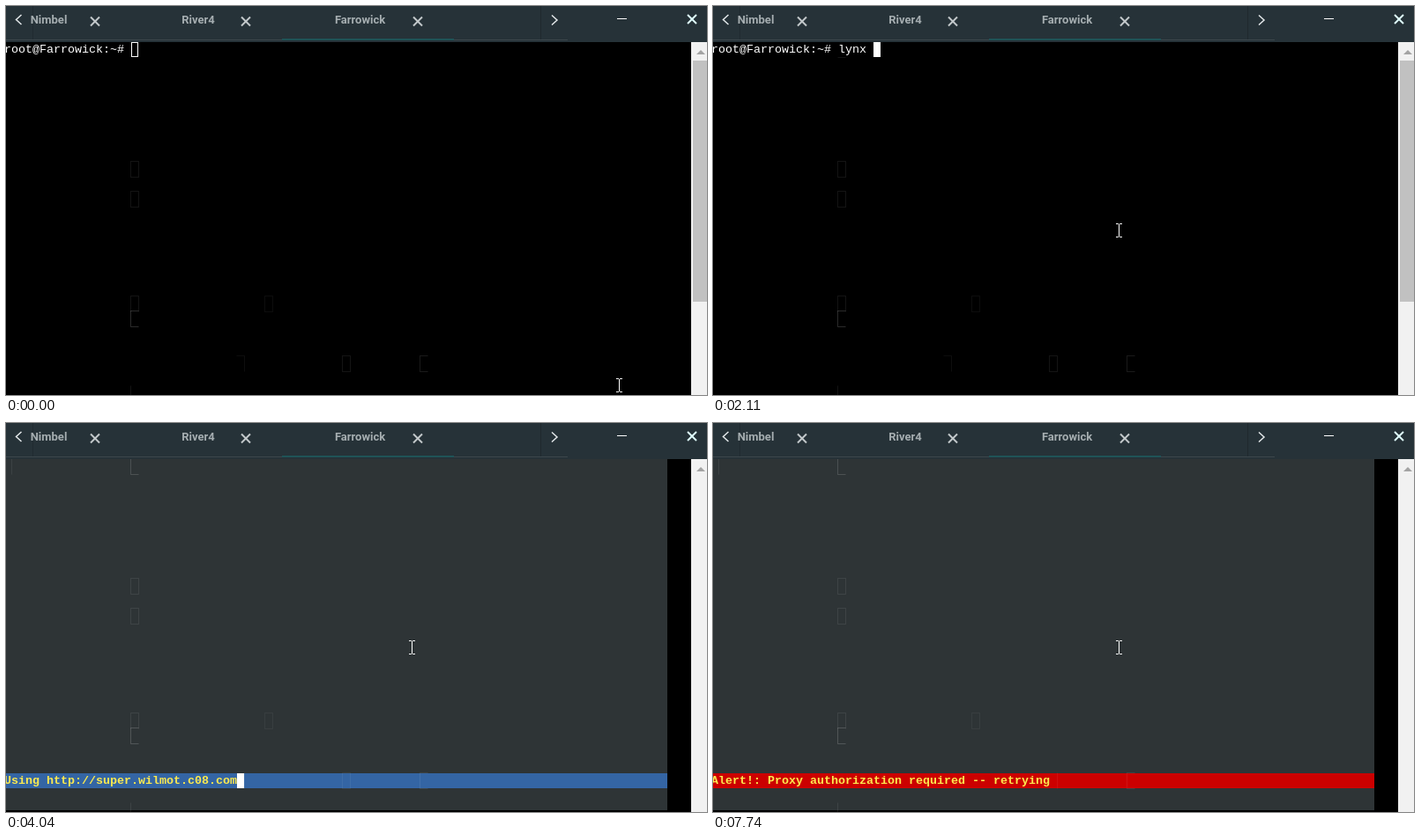
These frames come from a looping animation (795x442 px, 8 s). An HTML page with a canvas:

```html
<!DOCTYPE html>
<html lang="en">
<head>
<meta charset="utf-8">
<title>Terminal session</title>
<style>
html, body { margin: 0; width: 100%; height: 100%; overflow: hidden; background: #000; }
canvas { display: block; }
</style>
</head>
<body>
<canvas id="stage" width="795" height="442"></canvas>
<script>
const ctx = document.getElementById('stage').getContext('2d');
const LOOP = 8000;
const TOP = 41, CELL_W = 8, CELL_H = 17;
const PROMPT = 'root@Farrowick:~# ';
const COMMAND = 'lynx google.com';
const KEY_TIMES = [1460, 1710, 1910, 2010, 2110, 2280, 2330, 2550,
  2900, 3040, 3190, 3290, 3450, 3570, 3750];
const FOCUS = 990, ENTER = 4000, BROWSER = 4040, ALERT = 5980;
const STATUS = 'Using http://super.wilmot.c08.com';
const WARNING = 'Alert!: Proxy authorization required -- retrying';

// Faint cursor remnants: column, row, visible sides, opacity
const TRACES = [
  [18, 8, 'LTRB', .08], [18, 10, 'LTRB', .08], [18, 17, 'LTR', .08],
  [37, 17, 'LTRB', .05], [18, 18, 'LTB', .17], [18, 23, 'L', .08]
];

const colX = col => col * CELL_W - 2;
const rowY = row => TOP + row * CELL_H;

function rect(x, y, w, h, color) {
  ctx.fillStyle = color;
  ctx.fillRect(x, y, w, h);
}

function line(points, color, width) {
  ctx.strokeStyle = color;
  ctx.lineWidth = width;
  ctx.beginPath();
  points.forEach(([x, y], i) => i ? ctx.lineTo(x, y) : ctx.moveTo(x, y));
  ctx.stroke();
}

function cross(x, y, r, color, width) {
  line([[x - r, y - r], [x + r, y + r]], color, width);
  line([[x + r, y - r], [x - r, y + r]], color, width);
}

function mono(text, row, color, weight = '') {
  ctx.font = `${weight} 13.333px "Liberation Mono", monospace`;
  ctx.textAlign = 'left';
  ctx.fillStyle = color;
  ctx.fillText(text, colX(0), rowY(row) + 12);
}

function block(col, row) {
  rect(colX(col), rowY(row), CELL_W, CELL_H, '#fff');
}

function trace(col, row, sides, alpha) {
  const x = colX(col) - .5, y = rowY(row) - .5;
  const r = x + CELL_W + 1, b = y + CELL_H + 1;
  const edges = {
    L: [[x, y], [x, b]], R: [[r, y], [r, b]],
    T: [[x, y], [r, y]], B: [[x, b], [r, b]]
  };
  for (const side of sides) line(edges[side], `rgba(255,255,255,${alpha})`, 1);
}

function tab(name, center, closeX) {
  ctx.font = 'bold 13px Roboto, sans-serif';
  ctx.textAlign = 'center';
  ctx.fillStyle = '#a5adb0';
  ctx.fillText(name, center, 20);
  cross(closeX, 17.5, 5, '#c3c9cb', 2);
}

function header() {
  rect(0, 0, 795, TOP, '#263238');
  rect(30, 0, 1, 38, '#202b30');
  rect(606, 0, 1, 38, '#1f292e');
  rect(0, 38, 637, 1, '#3c474c');
  rect(313, 37, 195, 2, '#1f5357');
  tab('Nimbel', 48.5, 101);
  tab('River4', 218, 272);
  tab('Farrowick', 401.5, 467);
  line([[17.5, 10], [11.5, 15.5], [17.5, 21]], '#e4e8ea', 1.5);
  line([[619, 10.5], [625, 16], [619, 21.5]], '#e4e8ea', 1.5);
  rect(693, 14, 11, 1, '#fff');
  cross(778, 15, 5, '#e0ffff', 2);
}

function scrollbar(withThumb) {
  rect(777, TOP, 18, 401, '#f1f1f1');
  if (withThumb) rect(779, 62, 16, 274, '#c1c1c1');
  ctx.fillStyle = '#a3a3a3';
  ctx.beginPath();
  ctx.moveTo(783, 55);
  ctx.lineTo(788, 50);
  ctx.lineTo(793, 55);
  ctx.fill();
}

function pointerAt(t) {
  if (t >= 890 && t < FOCUS) return [469, 261];
  const step = t < 20 ? 0 : Math.min(14, 1 + Math.floor((t - 20) / (660 / 13)));
  const p = step / 14, e = p * p * (3 - 2 * p);
  return [Math.round(695 - 235 * e), Math.round(431 - 176 * e)];
}

function pointer(t) {
  const [x, y] = pointerAt(t);
  rect(x, y - 7, 1, 14, '#fff');
  for (const edge of [y - 8, y + 7]) {
    rect(x - 3, edge, 3, 1, '#fff');
    rect(x + 1, edge, 3, 1, '#fff');
  }
}

function shell(t) {
  const typed = KEY_TIMES.filter(k => t >= k).length;
  if (typed) trace(18, 0, 'B', .08);
  mono(PROMPT + COMMAND.slice(0, typed), 0, '#fff');
  if (t >= ENTER) {
    mono("Looking up  'google.com' first", 1, '#fff');
    block(0, 2);
  } else if (t >= FOCUS) {
    block(PROMPT.length + typed, 0);
  } else {
    ctx.strokeStyle = '#fff';
    ctx.lineWidth = 1;
    ctx.strokeRect(colX(18) + .5, TOP + .5, CELL_W - 1, CELL_H - 1);
  }
  trace(33, 21, 'TR', .05);
  trace(48, 21, 'LTRB', .08);
  trace(59, 21, 'LTB', .1);
}

function browser(t) {
  const alert = t >= ALERT;
  const text = alert ? WARNING : STATUS;
  const since = t - (alert ? ALERT : BROWSER);
  rect(0, TOP, 750, 399, '#2e3436');
  rect(0, rowY(21), 750, CELL_H, alert ? '#c00' : '#3465a4');
  trace(0, 0, 'R', .07);
  trace(18, 0, 'LB', .14);
  if (!alert) trace(33, 21, 'R', .06);
  trace(48, 21, alert ? 'R' : 'LTRB', .06);
  trace(59, 21, 'LTB', .08);
  mono(text, 21, '#fce94f', 'bold');
  if (Math.floor(since / 587) % 2 === 0) block(text.length, 21);
}

function draw(t) {
  rect(0, 0, 795, 442, '#000');
  const browsing = t >= BROWSER;
  if (browsing) browser(t);
  else shell(t);
  TRACES.forEach(args => trace(...args));
  header();
  scrollbar(!browsing);
  pointer(t);
}

const start = performance.now();
function tick() {
  draw((performance.now() - start) % LOOP);
  requestAnimationFrame(tick);
}
tick();
</script>
</body>
</html>
```
